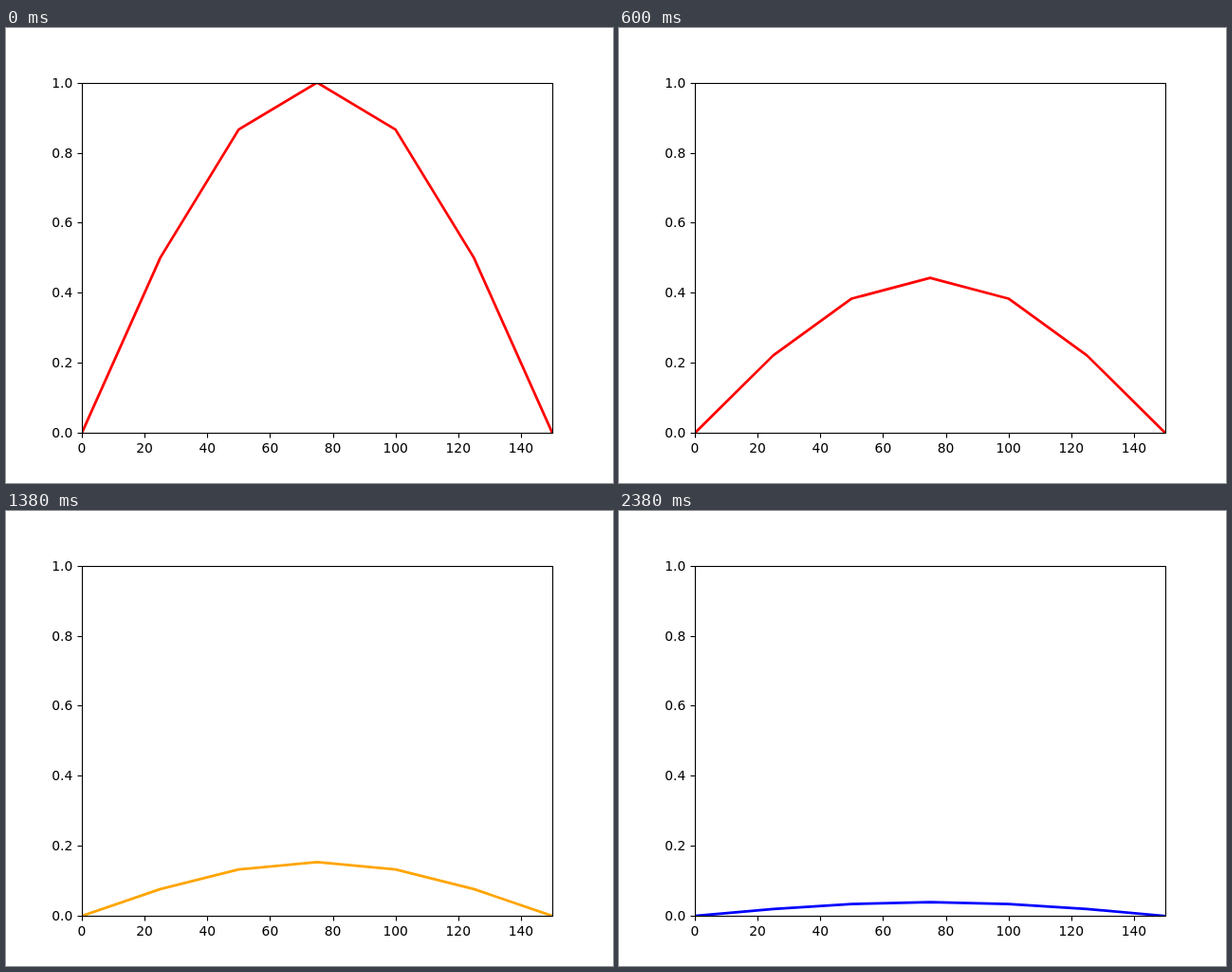
Write an HTML page that moves like this. It is 640x480 px and loops after 2400 ms.

```html
<!DOCTYPE html>
<html lang="en">
<head>
<meta charset="utf-8">
<title>Heat decay along a rod</title>
<style>
html, body { margin: 0; width: 100%; height: 100%; overflow: hidden; background: #fff; }
svg { display: block; width: 640px; height: 480px; }
text { font: 13.89px "DejaVu Sans", sans-serif; fill: #000; }
</style>
</head>
<body>
<svg viewBox="0 0 640 480">
  <clipPath id="plot"><rect x="80" y="58" width="497" height="370"/></clipPath>
  <polyline id="curve" clip-path="url(#plot)" fill="none" stroke-width="2.78"
    stroke-linejoin="round" stroke-linecap="square"/>
  <g id="axes" fill="none" stroke="#000" stroke-width="1.11">
    <rect x="80.5" y="58.5" width="496" height="369"/>
  </g>
  <g id="labels"></g>
</svg>
<script>
const LOOP = 2400, STEP = 20;
const LEFT = 80, BOTTOM = 427.2, WIDTH = 496, HEIGHT = 369.6;
const SEGMENTS = 6, RATE = 0.1;
// Per-step damping of the fundamental mode under explicit diffusion
const DAMPING = 1 - 2 * RATE * (1 - Math.cos(Math.PI / SEGMENTS));

const byId = id => document.getElementById(id);
const px = x => LEFT + x / 150 * WIDTH;
const py = u => BOTTOM - u * HEIGHT;
const snap = v => Math.floor(v + 0.5) + 0.5;

function add(parent, tag, attrs, text = "") {
  const el = document.createElementNS("http://www.w3.org/2000/svg", tag);
  for (const key in attrs) el.setAttribute(key, attrs[key]);
  el.textContent = text;
  byId(parent).appendChild(el);
}

for (let x = 0; x <= 140; x += 20) {
  add("axes", "path", { d: `M${snap(px(x))} 427.5v5` });
  add("labels", "text", { x: px(x), y: 448, "text-anchor": "middle" }, x);
}
for (let i = 0; i <= 5; i++) {
  const y = py(i / 5);
  add("axes", "path", { d: `M80.5 ${snap(y)}h-5` });
  add("labels", "text", { x: 70.3, y: Math.round(y + 5.06), "text-anchor": "end" }, (i / 5).toFixed(1));
}

const curve = byId("curve");

function draw(time) {
  const n = Math.floor((time % LOOP) / STEP);
  const peak = DAMPING ** n;
  const points = [];
  for (let i = 0; i <= SEGMENTS; i++) {
    const u = peak * Math.sin(Math.PI * i / SEGMENTS);
    points.push(`${px(i * 25).toFixed(2)},${py(u).toFixed(2)}`);
  }
  curve.setAttribute("points", points.join(" "));
  curve.setAttribute("stroke", ["red", "orange", "blue"][Math.floor(n / 40)]);
}

const start = performance.now();
function tick() {
  draw(performance.now() - start);
  requestAnimationFrame(tick);
}
tick();
</script>
</body>
</html>
```
